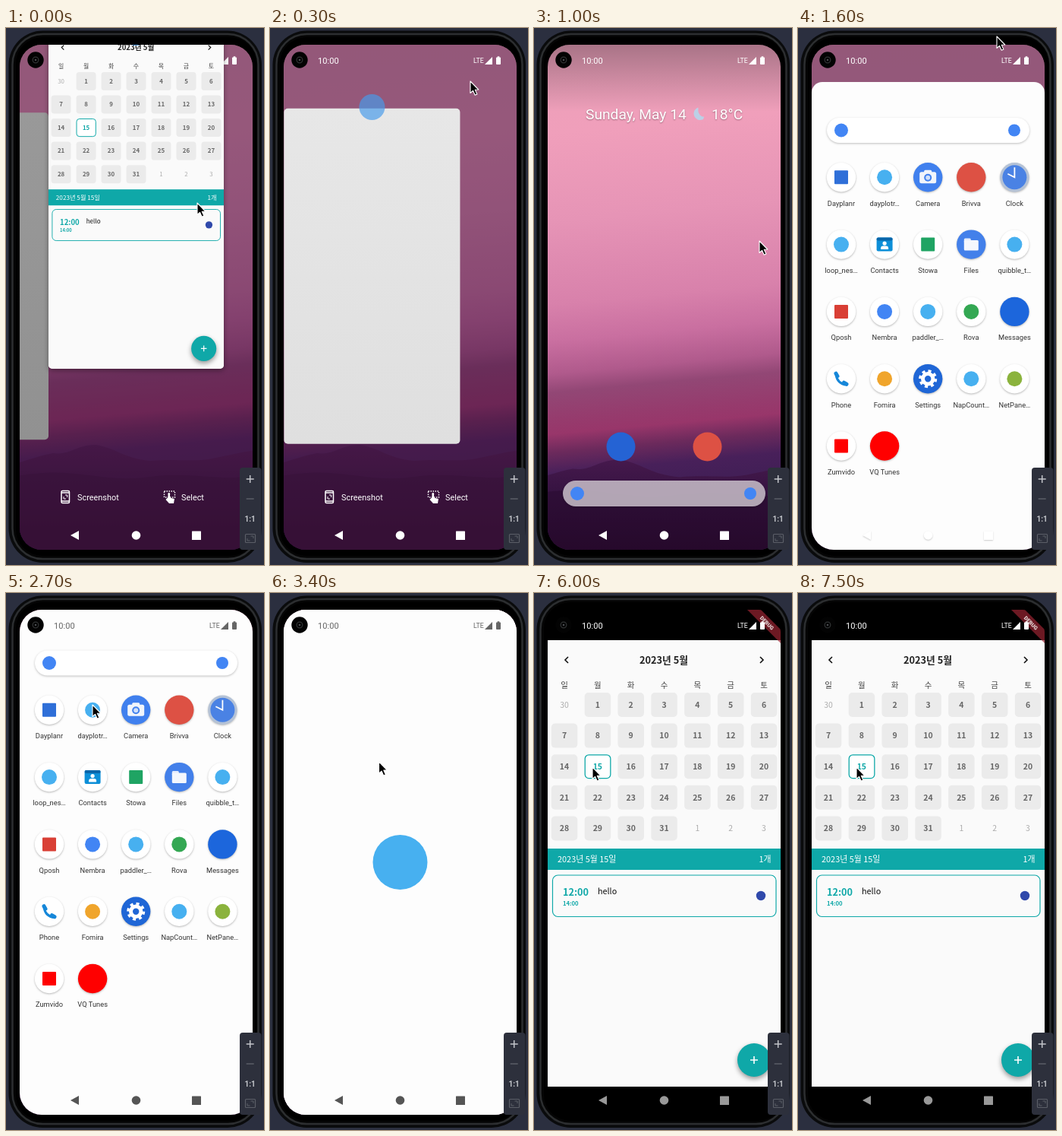
An HTML page with a canvas for the animation above (7600 ms loop, 340x706 px).

```html
<!DOCTYPE html>
<html lang="ko">
<head>
<meta charset="utf-8">
<title>Phone demo</title>
<style>
html, body { margin: 0; width: 100%; height: 100%; overflow: hidden; background: #2b2f3f; }
canvas { display: block; }
</style>
</head>
<body>
<canvas id="stage" width="340" height="706"></canvas>
<script>
const c = document.getElementById('stage').getContext('2d');
const LOOP = 7600, STEP = 100, TAU = Math.PI * 2;
const TEAL = '#0fa8a8', PAPER = '#fafafa', SKY_BLUE = '#47b0f0';
const KR = '"Noto Sans CJK KR", "Noto Sans CJK", sans-serif';
const LATIN = 'Roboto, sans-serif';

// Linear interpolation through [time, value] pairs.
function at(t, keys) {
  if (t <= keys[0][0]) return keys[0][1];
  for (let i = 1; i < keys.length; i++) {
    const [a, v] = keys[i - 1], [b, w] = keys[i];
    if (t <= b) return v + (w - v) * (t - a) / (b - a);
  }
  return keys[keys.length - 1][1];
}
const mix = (a, b, p) => a + (b - a) * p;

function layer(alpha, draw) {
  if (alpha <= 0) return;
  c.save();
  c.globalAlpha *= Math.min(1, alpha);
  draw();
  c.restore();
}
function shadow(color, blur, y) {
  c.shadowColor = color; c.shadowBlur = blur; c.shadowOffsetY = y;
}
function rr(x, y, w, h, r, fill, stroke, lw = 1) {
  c.beginPath();
  c.roundRect(x, y, w, h, r);
  if (fill) { c.fillStyle = fill; c.fill(); }
  if (stroke) { c.strokeStyle = stroke; c.lineWidth = lw; c.stroke(); }
}
function dot(x, y, r, fill) {
  c.beginPath(); c.arc(x, y, r, 0, TAU);
  c.fillStyle = fill; c.fill();
}
function poly(points, fill) {
  c.beginPath();
  points.forEach(([x, y]) => c.lineTo(x, y));
  c.closePath();
  c.fillStyle = fill; c.fill();
}
function line(points, color, lw) {
  c.beginPath();
  points.forEach(([x, y]) => c.lineTo(x, y));
  c.strokeStyle = color; c.lineWidth = lw; c.stroke();
}
function plus(x, y, r, color, lw) {
  line([[x - r, y], [x + r, y]], color, lw);
  line([[x, y - r], [x, y + r]], color, lw);
}
function text(s, x, y, size, color, { align = 'left', weight = 400, font = LATIN } = {}) {
  c.font = `${weight} ${size}px ${font}`;
  c.textAlign = align;
  c.fillStyle = color;
  c.fillText(s, x, y + size * 0.36);
}

// Zoomed in at home, pulled back and tinted behind cards and sheets.
function wallpaper(back) {
  c.save();
  const s = mix(1.1, 1, back);
  c.translate(171, 354); c.scale(s, s); c.translate(-171, -354);
  const sky = c.createLinearGradient(140, 22, 190, 570);
  [[0, '#eaa0b7'], [.23, '#f09fbb'], [.42, '#e694b6'], [.6, '#d881ab'], [.68, '#c96fa0'],
   [.75, '#b05a8c'], [.79, '#924775'], [.85, '#963b6d'], [.88, '#98366a'], [.92, '#6c2a5c'],
   [.965, '#48205a'], [1, '#431f57']]
    .forEach(([p, col]) => sky.addColorStop(p, col));
  c.fillStyle = sky; c.fillRect(0, 0, 340, 706);
  const far = c.createLinearGradient(0, 548, 0, 660);
  far.addColorStop(0, '#46194d'); far.addColorStop(.35, '#361341'); far.addColorStop(1, '#27092c');
  c.beginPath();
  c.moveTo(0, 576);
  c.bezierCurveTo(30, 568, 45, 562, 62, 559);
  c.bezierCurveTo(85, 562, 92, 548, 118, 548);
  c.bezierCurveTo(145, 552, 155, 566, 190, 569);
  c.bezierCurveTo(225, 566, 245, 571, 272, 566);
  c.bezierCurveTo(300, 560, 310, 558, 340, 553);
  c.lineTo(340, 760); c.lineTo(0, 760);
  c.fillStyle = far; c.fill();
  c.beginPath();
  c.moveTo(0, 592);
  c.bezierCurveTo(90, 572, 120, 600, 190, 590);
  c.bezierCurveTo(250, 582, 290, 600, 340, 585);
  c.lineTo(340, 760); c.lineTo(0, 760);
  c.fillStyle = 'rgba(37,8,42,.4)'; c.fill();
  c.restore();
  layer(back, () => {
    c.fillStyle = 'rgba(70,24,66,.52)'; c.fillRect(0, 0, 340, 706);
  });
  layer(1 - back, () => {
    const top = c.createLinearGradient(0, 22, 0, 110);
    top.addColorStop(0, 'rgba(40,30,40,.34)'); top.addColorStop(1, 'rgba(40,30,40,0)');
    c.fillStyle = top; c.fillRect(0, 0, 340, 112);
  });
}

function statusBar(color) {
  text('10:00', 63, 43, 11.1, color);
  text('LTE', 268, 43, 8.8, color);
  poly([[283, 48], [293, 48], [293, 38]], color);
  rr(298, 38.5, 6, 9.5, 1, color);
  c.fillRect(299.7, 37.3, 2.6, 2);
}
function navBar(color) {
  poly([[85, 667], [96, 661], [96, 673]], color);
  dot(171.5, 667, 5.8, color);
  rr(245, 661.5, 12, 11.5, .5, color);
}

function dayCell(i, selected) {
  const x = 40 + (i % 7) * 43.83, y = 147 + Math.floor(i / 7) * 40.6;
  const inMonth = i > 0 && i < 32;
  const label = inMonth ? i : i ? i - 31 : 30;
  const picked = i === selected;
  if (picked) rr(x - 16.6, y - 15.4, 33.6, 30.8, 5, '#fff', TEAL, 1.3);
  else if (inMonth) rr(x - 17.2, y - 16, 34.5, 32, 5, '#ebebeb');
  text(label, x, y, 10.5, picked ? TEAL : inMonth ? '#666' : '#adadad',
    { align: 'center', weight: inMonth ? 700 : 400, font: KR });
}
function agenda(selected) {
  const kr = { font: KR }, bold = { font: KR, weight: 700 };
  c.fillStyle = PAPER; c.fillRect(18, 62, 307, 587);
  text('2023년 5월', 171, 88, 12.8, '#222', { ...bold, align: 'center' });
  line([[45, 84], [41, 88], [45, 92]], '#111', 1.6);
  line([[298, 84], [302, 88], [298, 92]], '#111', 1.6);
  [...'일월화수목금토'].forEach((d, i) =>
    text(d, 40 + i * 43.83, 121, 10.5, '#444', { ...kr, align: 'center' }));
  for (let i = 0; i < 35; i++) dayCell(i, selected);
  const has = selected === 15;
  c.fillStyle = TEAL; c.fillRect(18, 336, 307, 28);
  text(`2023년 5월 ${selected}일`, 31, 350, 10.9, '#fff', kr);
  text(has ? '1개' : '0개', 312.5, 350, 10.9, '#fff', { ...kr, align: 'right' });
  if (has) {
    rr(24.5, 371, 294.5, 54.5, 7, PAPER, TEAL, 1.2);
    text('12:00', 38, 393.5, 12.7, TEAL, bold);
    text('14:00', 38, 408, 7.7, TEAL, bold);
    text('hello', 84, 392, 10.8, '#111', kr);
    dot(299, 398, 6.2, '#3049ab');
  } else {
    text('스케줄이 없습니다.', 171, 510, 10.9, '#222', { ...kr, align: 'center' });
  }
  c.save();
  shadow('rgba(0,0,0,.4)', 6, 3);
  dot(290, 614, 22, TEAL);
  c.restore();
  plus(290, 614, 5, '#fff', 1.6);
}
function agendaScreen(selected) {
  c.fillStyle = '#000'; c.fillRect(0, 0, 340, 706);
  agenda(selected);
  poly([[281, 22], [299, 22], [325, 48], [325, 66]], 'rgba(160,38,52,.68)');
  statusBar('#fff');
  c.save();
  c.translate(307, 39.5); c.rotate(Math.PI / 4);
  text('DEBUG', 0, 0, 7, '#e8dcdc', { align: 'center', weight: 900 });
  c.restore();
  navBar('#999');
}

function recentsActions() {
  const w = '#fff';
  rr(73, 608.5, 10.5, 16, 1.5, null, w, 1.5);
  line([[73, 611], [83.5, 611]], w, 1.5);
  line([[73, 622], [83.5, 622]], w, 1.5);
  line([[78, 614], [80.7, 614], [80.7, 617]], w, 1);
  line([[76, 616], [76, 619], [79, 619]], w, 1);
  text('Screenshot', 94, 617, 10.9, w);
  c.setLineDash([1.5, 1.5]);
  rr(208.5, 609, 14, 8, 0, null, w, 1.4);
  c.setLineDash([]);
  rr(213.5, 611, 2.6, 10, 1.3, w);
  poly([[213.5, 617], [222, 619], [221, 625], [215, 625], [210.5, 620]], w);
  text('Select', 231, 617, 10.9, w);
}
function recents(t, fade) {
  const p = 1 - (1 - Math.min(1, t / 500)) ** 2;
  const right = mix(56, 287.5, p), h = mix(430, 443, p), w = 232;
  layer(fade, () => {
    const edge = right - w - 11.5;
    rr(edge - 225, 111, 225, 431, 5, '#30272b');
    text('sueño', edge, 443, 9, '#776d73', { align: 'right' });
    text('eación', edge, 457, 9, '#776d73', { align: 'right' });
    const g = Math.round(mix(153, 246, p));
    const paper = c.createLinearGradient(0, 105, 0, 548);
    paper.addColorStop(0, `rgb(${g},${g},${g})`);
    paper.addColorStop(1, `rgb(${g - 8},${g - 8},${g - 8})`);
    rr(right - w, 326.3 - h / 2, w, h, 5, paper);
    layer((p - .5) * 2, () => dot(right - w / 2, 104, 17, '#489bea'));
  });
  layer(fade ** 3, recentsActions);

  const top = at(t, [[0, 6], [100, -130], [200, -280], [300, -450]]);
  if (top <= -450) return;
  c.save();
  shadow('rgba(0,0,0,.4)', 6, 2);
  rr(56, top, 231, 442, 5, PAPER);
  c.restore();
  c.save();
  c.beginPath(); c.roundRect(56, top, 231, 442, 5); c.clip();
  c.translate(56, top); c.scale(.7525, .7525); c.translate(-18, -62);
  agenda(15);
  c.restore();
  dot(171, top, 17, '#489bea');
}

function searchBox(y, h, fill) {
  c.save();
  shadow('rgba(0,0,0,.25)', 3, 1);
  rr(38, y - h / 2, 267, h, h / 2, fill);
  c.restore();
  dot(57, y, 9, '#4285f4');
  dot(285, y, 8, '#4285f4');
}
function home() {
  c.save();
  shadow('rgba(0,0,0,.35)', 2, 1);
  text('Sunday, May 14', 68, 113, 19.2, '#fff');
  text('18°C', 234, 113, 19.2, '#fff');
  c.restore();
  c.beginPath();
  c.arc(219, 112.5, 8.5, -1.9, 1.1, true);
  c.arc(224.5, 108.5, 8.2, 1.6, -2.9);
  c.closePath();
  c.fillStyle = '#bcd0e6'; c.fill();
  dot(114.5, 550.5, 19, '#2563d4');
  dot(228.5, 550.5, 19, '#dd5144');
  searchBox(612, 34, 'rgba(205,195,206,.84)');
}

// Glyphs are drawn around 0,0.
const glyphs = {
  circle: col => dot(0, 0, 10, col),
  square: col => rr(-9, -9, 18, 18, 1, col),
  camera() {
    rr(-11, -7, 22, 15, 2.5, '#f1f5fb');
    rr(-5, -9.5, 10, 5, 1.5, '#f1f5fb');
    dot(0, .5, 5, '#4080ee'); dot(0, .5, 3, '#cfe0fb');
  },
  clock() {
    dot(0, 0, 16, '#4a82e4');
    line([[-9, -4.5], [0, 0], [0, -13]], '#fff', 1.8);
  },
  person() {
    rr(-10.5, -9, 21, 18, 2, '#0d8fd8');
    rr(-10.5, -9, 21, 4, 2, '#0a66aa');
    dot(0, -1.5, 2.6, '#fff'); rr(-5, 2, 10, 4.5, [3, 3, 0, 0], '#fff');
  },
  folder() {
    rr(-9.5, -8, 9, 6, 1.5, '#e3ebfb'); rr(-9.5, -5.5, 19, 13.5, 1.5, '#f4f7fd');
  },
  handset() {
    c.lineCap = 'round';
    c.beginPath(); c.moveTo(-7, -6);
    c.bezierCurveTo(-6, 2, -1, 7, 7, 8);
    c.strokeStyle = '#1687d9'; c.lineWidth = 3; c.stroke();
    line([[-7, -7], [-5, -3.5]], '#1687d9', 5);
    line([[3.5, 5], [7, 7]], '#1687d9', 5);
  },
  gear() {
    c.beginPath(); c.arc(0, 0, 10, 0, TAU);
    c.strokeStyle = '#fff'; c.lineWidth = 4;
    c.setLineDash([TAU * 10 / 16]); c.stroke(); c.setLineDash([]);
    c.beginPath(); c.arc(0, 0, 6.7, 0, TAU);
    c.lineWidth = 5; c.stroke();
  }
};
const WHITE = '#fff';
const apps = [
  ['Dayplanr', WHITE, 'square', '#2f6fd8'], ['dayplotr…', WHITE, 'circle', SKY_BLUE],
  ['Camera', '#4080ee', 'camera'], ['Brivva', '#dd5144'], ['Clock', '#b4c2d6', 'clock'],
  ['loop_nes…', WHITE, 'circle', SKY_BLUE], ['Contacts', WHITE, 'person'],
  ['Stowa', WHITE, 'square', '#1fa463'], ['Files', '#4380ea', 'folder'],
  ['quibble_t…', WHITE, 'circle', SKY_BLUE],
  ['Qposh', WHITE, 'square', '#d93f35'], ['Nembra', WHITE, 'circle', '#4285f4'],
  ['paddler_…', WHITE, 'circle', SKY_BLUE], ['Rova', WHITE, 'circle', '#34a853'],
  ['Messages', '#1c66dc'],
  ['Phone', WHITE, 'handset'], ['Fomira', WHITE, 'circle', '#f0a52c'],
  ['Settings', '#1f66d6', 'gear'], ['NapCount…', WHITE, 'circle', SKY_BLUE],
  ['NetPane…', WHITE, 'circle', '#8bb33d'],
  ['Zumvido', WHITE, 'square', '#f00'], ['VQ Tunes', '#f00']
];
function drawer(top) {
  const near = (top - 22) / 49;
  rr(18, top, 307, 720, 14 * Math.min(1, near), '#fdfdfd');
  c.save();
  c.translate(0, near * 42.5);
  searchBox(92, 33, '#fff');
  apps.forEach(([label, disc, glyph, color], i) => {
    const x = 57 + (i % 5) * 57.1, y = 153.8 + Math.floor(i / 5) * 88.3;
    c.save();
    c.translate(x, y);
    c.save();
    shadow('rgba(0,0,0,.28)', 2.5, 1);
    dot(0, 0, 19.2, disc);
    c.restore();
    if (glyph) glyphs[glyph](color);
    c.restore();
    text(label, x, y + 34, 9.3, '#333', { align: 'center' });
  });
  c.restore();
}

function launch(t) {
  const p = 1 - (1 - Math.min(1, (t - 2900) / 400)) ** 2;
  const x = mix(95, 18, p), y = mix(135, 22, p);
  rr(x, y, mix(38, 307, p), mix(38, 664, p), mix(19, 22, p), '#fdfdfd');
  dot(mix(114, 171.5, p), mix(154, 354, p), mix(10, 36, p), SKY_BLUE);
}

function screen(t) {
  if (t >= 4300) return agendaScreen(t < 5800 ? 14 : 15);
  if (t < 1000) {
    const fade = at(t, [[700, 1], [800, .87], [900, .35], [1000, 0]]);
    wallpaper(at(t, [[700, 1], [800, .94], [900, .4], [1000, 0]]));
    statusBar('#fff');
    layer(1 - fade * 1.6, home);
    recents(t, fade);
    return navBar('#fff');
  }
  const top = at(t, [[1200, 690], [1300, 620], [1400, 420], [1500, 200], [1600, 71], [1700, 32], [1800, 22]]);
  const open = (690 - top) / 668;
  wallpaper(Math.min(1, open * 1.1));
  layer(1 - open * 2.5, home);
  if (open > 0) drawer(top);
  if (t >= 2900) launch(t);
  const dark = t >= 1700;
  statusBar(dark ? '#666' : '#fff');
  c.save();
  if (!dark && open > 0) shadow('rgba(0,0,0,.2)', 2, 1);
  navBar(dark ? '#555' : '#fff');
  c.restore();
}

function phone() {
  c.fillStyle = '#2b2f3f'; c.fillRect(0, 0, 340, 706);
  rr(3.5, 3.5, 333.5, 699.5, 45, '#0a0b0c');
  rr(8.5, 8, 324, 690, 40, '#050505', '#2c2e30', 2.5);
  rr(13, 12, 317, 682, 35, '#000');
}
function cameraHole() {
  dot(39, 42, 10.7, '#030303');
  c.beginPath(); c.arc(39, 42, 3.8, 0, TAU);
  c.strokeStyle = '#303233'; c.lineWidth = 1.3; c.stroke();
  dot(39, 42, 1.3, '#4a4d50');
}
function zoomPanel() {
  const dim = '#5b5e67', lit = '#c3c5ca';
  rr(308, 578, 28.5, 108, 4, '#2d303c');
  plus(321.7, 593, 5, lit, 1.5);
  line([[316.7, 619], [326.7, 619]], dim, 1.5);
  text('1:1', 321.7, 645, 10, lit, { align: 'center', weight: 700 });
  rr(315.5, 665.5, 13, 11, 1, null, dim, 1.2);
  line([[322.5, 668], [326, 668], [326, 671]], dim, 1);
  line([[318, 671], [318, 674], [321.5, 674]], dim, 1);
}
const pathX = [[0, 252], [200, 258], [300, 264], [700, 313], [800, 311], [1000, 297], [1200, 272],
  [1600, 262], [1900, 262], [2600, 114], [3100, 114], [4300, 232], [5000, 232], [5600, 77]];
const pathY = [[0, 230], [200, 90], [300, 70], [700, 262], [800, 269], [1000, 280], [1200, 440],
  [1300, 420], [1600, 11], [1900, 20], [2600, 147], [3100, 147], [4300, 446], [5000, 446], [5600, 229]];
function cursor(t) {
  c.save();
  c.translate(at(t, pathX), at(t, pathY));
  c.lineJoin = 'round';
  poly([[0, 0], [0, 15.5], [3.5, 12.3], [6.2, 18.3], [8.9, 17.1], [6.3, 11.3], [10.8, 11]], '#000');
  c.strokeStyle = '#fff'; c.lineWidth = 1.1; c.stroke();
  c.restore();
}

function frame(now) {
  const t = Math.floor(now % LOOP / STEP) * STEP;
  phone();
  c.save();
  c.beginPath(); c.roundRect(18, 22, 307, 664, 29); c.clip();
  screen(t);
  c.restore();
  cameraHole();
  zoomPanel();
  cursor(t);
  requestAnimationFrame(frame);
}
requestAnimationFrame(frame);
</script>
</body>
</html>
```
